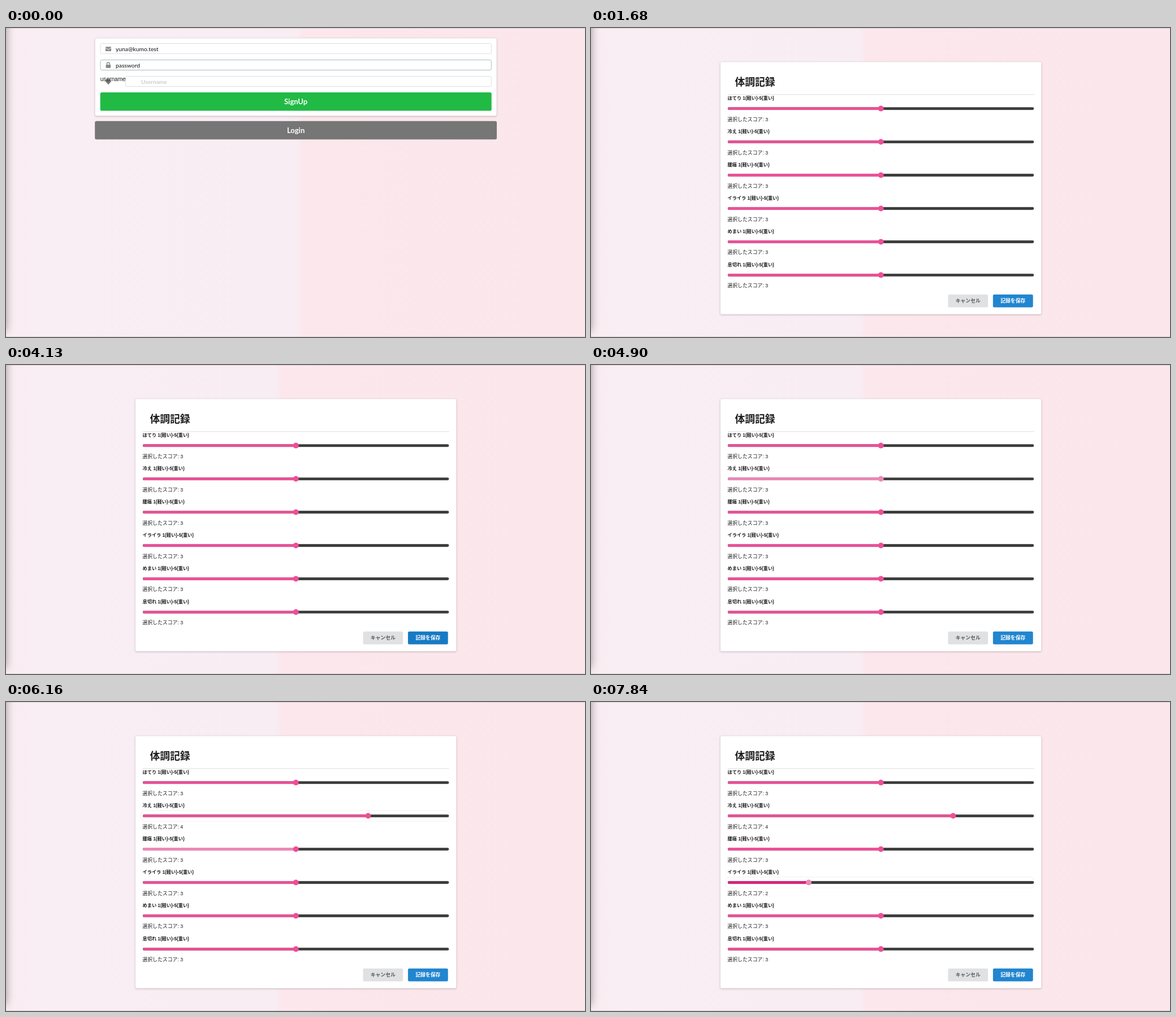
These frames come from a looping animation (1024 px wide and 547 px high, 8000 ms). An HTML page:

```html
<!DOCTYPE html>
<html lang="ja">
<head>
<meta charset="utf-8">
<style>
  html, body { margin: 0; width: 100%; height: 100%; overflow: hidden; }
  svg { display: block; width: 100vw; height: 100vh; }
  text { font-family: "Liberation Sans", "Noto Sans CJK JP", "Noto Sans CJK", sans-serif; fill: #1d1d1f; white-space: pre; }
  .lato { font: 10.3px Lato, sans-serif; fill: #111; }
  .action { font: bold 13px Lato, sans-serif; fill: #fff; text-anchor: middle; }
  .label { font-size: 8.2px; font-weight: bold; }
  .score { font-size: 8.9px; }
  .button { font-size: 8.85px; font-weight: bold; text-anchor: middle; }
  .field { fill: #fff; stroke: #dedede; }
  .panel { fill: #fff; stroke: #e4dbe0; stroke-width: .6; filter: drop-shadow(0 1px 1.5px #0003); }
  .border { fill: none; stroke-width: .6; stroke-opacity: .5; }
  .ring { fill: none; stroke: #f4eff1; }
</style>
</head>
<body>
<svg viewBox="0 0 1024 547" preserveAspectRatio="none">
  <defs>
    <linearGradient id="wash" gradientUnits="userSpaceOnUse" x1="0" x2="1024" y1="0" y2="0">
      <stop offset="0" stop-color="#f9edf2"/>
      <stop offset=".06" stop-color="#f9eef3"/>
      <stop class="seam" stop-color="#f8edf3"/>
      <stop class="seam" stop-color="#fbe7ec"/>
      <stop offset="1" stop-color="#fbe6eb"/>
    </linearGradient>
    <filter id="blur" x="-200%" width="500%"><feGaussianBlur stdDeviation="8"/></filter>
  </defs>
  <rect width="1024" height="547" fill="url(#wash)"/>
  <rect x="-20" y="-20" width="20" height="556" fill="#000" opacity=".38" filter="url(#blur)"/>
  <path d="M0 .25H1024M0 546.75H1024" stroke="#a9a1a5" stroke-width=".5"/>

  <g id="signup">
    <rect class="panel" x="157.5" y="18" width="710.3" height="137.5" rx="3"/>
    <rect class="field" x="167" y="27.5" width="691.3" height="18" rx="2.5"/>
    <rect class="field" x="167" y="56.5" width="691.3" height="18" rx="2.5" style="stroke:#a9bdc3"/>
    <rect class="field" x="211.5" y="85.5" width="646.8" height="18" rx="2.5"/>
    <g fill="#888">
      <path d="M176 33.2h10v1.2l-5 3.5-5-3.5zM176 35.6l5 3.4 5-3.4V41h-10z"/>
      <rect x="176.6" y="65" width="8.6" height="5.8" rx="1"/>
      <path d="M178.4 65.5v-2a2.5 2.5 0 0 1 5 0v2" fill="none" stroke="#888" stroke-width="1.4"/>
      <path d="M178 91h6l2.2 3.5-5.2 5.7-5.2-5.7z" fill="#777"/>
    </g>
    <text class="lato" x="194" y="40.6">yuna@kumo.test</text>
    <text class="lato" x="194" y="69.6">password</text>
    <text class="lato" x="239" y="98.7" style="fill:#bdbdbd">Username</text>
    <text x="166.7" y="94.4" font-size="10.15">username</text>
    <rect id="caret" x="236.5" y="60" width="1" height="12" fill="#111"/>
    <rect x="166.7" y="114" width="692" height="32.6" rx="2.6" fill="#21ba45"/>
    <text class="action" x="512.6" y="135">SignUp</text>
    <rect x="157.2" y="164.8" width="710.8" height="32.4" rx="2.6" fill="#767676"/>
    <text class="action" x="512.6" y="185.6">Login</text>
  </g>

  <g id="record">
    <rect class="panel" x="228.7" y="60" width="567.8" height="446.8" rx="2.6"/>
    <text x="254.5" y="101.6" font-size="17.8" font-weight="bold">体調記録</text>
    <path d="M241.5 117.8H784" stroke="#dededf"/>
    <g id="sliders"></g>
    <rect x="631.5" y="471.8" width="70.6" height="22.8" rx="2.4" fill="#e0e1e2"/>
    <text class="button" x="666.8" y="486.3" style="fill:#5a5a5a">キャンセル</text>
    <rect id="save" x="710.9" y="471.8" width="70.8" height="22.8" rx="2.4"/>
    <text class="button" x="746.3" y="486.3" style="fill:#fff">記録を保存</text>
  </g>
</svg>
<script>
const LOOP = 8000, LEFT = 242, WIDTH = 541.3;
const PINK = '#ef4e97', LIGHT = '#ee86b6', DEEP = '#dc217b', MID = '#f069a6';
const FILL = { idle: PINK, hover: LIGHT, press: DEEP };
const BORDER = { idle: '#858585', hover: '#acacac', press: '#6e6e6e' };
const $ = id => document.getElementById(id);
const set = (node, attrs) => { for (const key in attrs) node.setAttribute(key, attrs[key]); };

// Value of the last [time, value] step that has begun
const at = (steps, t) => steps.reduce((value, [start, next]) => t >= start ? next : value, steps[0][1]);

const caretSteps = [[0, 0], [210, 1], [700, 0], [1260, 1]];
const saveSteps = [[0, '#2185d0'], [2800, '#1b7ec8'], [2870, '#1678c2'], [4130, '#177ac4'], [4200, '#2185d0']];
const still = { track: [[0, 'idle']], thumb: [[0, PINK]], score: [[0, 3]], focus: [[0, 0]] };
const rows = [
  { name: 'ほてり' },
  {
    name: '冷え',
    track: [[0, 'idle'], [4410, 'hover'], [4970, 'press'], [5460, 'hover'], [5880, 'idle']],
    thumb: [[0, PINK], [4900, LIGHT], [5600, MID], [5670, PINK]],
    score: [[0, 3], [5390, 4]],
    focus: [[0, 0], [4970, 1], [7840, 0]]
  },
  { name: '腰痛', track: [[0, 'idle'], [6160, 'hover'], [6300, 'idle'], [6440, 'hover'], [6720, 'idle']] },
  {
    name: 'イライラ',
    track: [[0, 'idle'], [7070, 'hover'], [7840, 'press']],
    thumb: [[0, PINK], [7840, LIGHT]],
    score: [[0, 3], [7840, 2]],
    focus: [[0, 0], [7840, 1]]
  },
  { name: 'めまい' },
  { name: '息切れ' }
].map(row => ({ ...still, ...row }));

$('sliders').innerHTML = rows.map((row, i) => `<g transform="translate(0 ${i * 58.95})">
  <text class="label" x="241.5" y="127.2">${row.name} 1(軽い)-5(重い)</text>
  <rect class="ring" x="238.5" y="133.2" width="545" height="19" rx="6"/>
  <rect x="${LEFT}" y="140.2" width="${WIDTH}" height="4.9" rx="2.4" fill="#3b3b3b"/>
  <rect class="fill" x="${LEFT}" y="140.2" height="4.9" rx="2.4"/>
  <rect class="border" x="${LEFT}" y="140.3" width="${WIDTH}" height="4.7" rx="2.3"/>
  <circle cy="142.6" r="5"/>
  <text class="score" x="241.3" y="164.7"></text>
</g>`).join('');

rows.forEach((row, i) => {
  const group = $('sliders').children[i];
  for (const part of ['ring', 'fill', 'border', 'score']) row[part + 'Node'] = group.querySelector('.' + part);
  row.knob = group.querySelector('circle');
});

function drawSlider(row, t) {
  const state = at(row.track, t), score = at(row.score, t);
  const x = 512.7 + (score - 3) * 127.7;
  set(row.fillNode, { width: x - LEFT, fill: FILL[state] });
  set(row.borderNode, { stroke: BORDER[state] });
  set(row.knob, { cx: x, fill: at(row.thumb, t) });
  set(row.ringNode, { opacity: at(row.focus, t) });
  row.scoreNode.textContent = `選択したスコア: ${score}`;
}

function draw(now) {
  const t = now % LOOP, recording = t >= 1680;
  set($('signup'), { display: recording ? 'none' : 'inline' });
  set($('record'), { display: recording ? 'inline' : 'none' });
  const seam = recording ? 476 : 515;
  document.querySelectorAll('.seam').forEach((stop, i) => set(stop, { offset: (seam + i * 12) / 1024 }));
  set($('caret'), { opacity: at(caretSteps, t) });
  set($('save'), { fill: at(saveSteps, t) });
  rows.forEach(row => drawSlider(row, t));
  requestAnimationFrame(draw);
}
draw(0);
</script>
</body>
</html>
```
